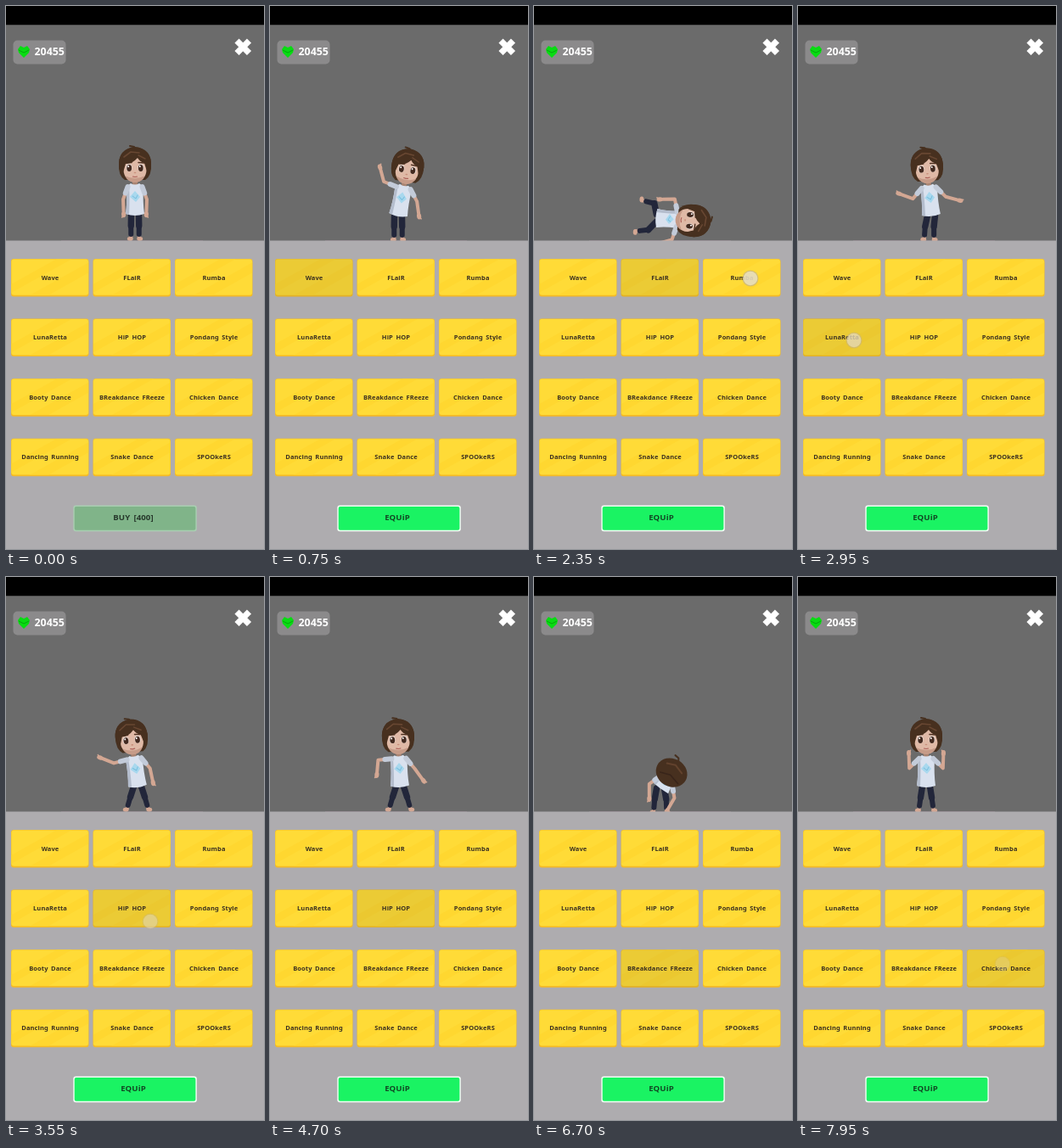
These frames come from a looping animation (304x640 px, 8000 ms). An HTML page with a canvas:

```html
<!DOCTYPE html>
<html lang="en">
<head>
<meta charset="utf-8">
<title>Dance shop</title>
<style>
  html, body { margin: 0; width: 100%; height: 100%; overflow: hidden; background: #aeacaf; }
  canvas { display: block; width: 304px; height: 640px; }
</style>
</head>
<body>
<canvas id="stage"></canvas>
<script>
const LOOP = 8000, STEP = 50;
const FONT = '"Noto Sans", "Open Sans", sans-serif';
const canvas = document.getElementById('stage');
const ctx = canvas.getContext('2d');
const ratio = window.devicePixelRatio || 1;
canvas.width = 304 * ratio;
canvas.height = 640 * ratio;

const SKIN = '#d3a793', FACE = '#dfb9a6', HAIR = '#47301f', SHIRT = '#d9e1ee', JEANS = '#22263a';

const labels = [
  'Wave', 'FLaiR', 'Rumba',
  'LunaRetta', 'HiP HOP', 'Pondang Style',
  'Booty Dance', 'BReakdance FReeze', 'Chicken Dance',
  'Dancing Running', 'Snake Dance', 'SPOOkeRS'
];

// Taps: time, button index, touch position
const taps = [
  [450, 0, 60, 325], [1700, 1, 158, 324], [2400, 2, 255, 321],
  [2950, 3, 66, 394], [3450, 4, 170, 406], [4950, 5, 256, 396],
  [5500, 6, 66, 464], [6100, 7, 160, 464], [7750, 8, 241, 456]
];

// Limb angles are degrees away from straight down, positive pointing outward.
const rest = {
  dx: 0, dy: 0, roll: 0, lean: 0, tuck: 0, bow: 0,
  armL: 20, foreL: -2, armR: 20, foreR: -2,
  legL: 1, shinL: 0, legR: 1, shinR: 0
};
const pose = changes => ({ ...rest, ...changes });
const flipped = p => ({
  ...p, dx: -p.dx, lean: -p.lean,
  armL: p.armR, foreL: p.foreR, armR: p.armL, foreR: p.foreL,
  legL: p.legR, shinL: p.shinR, legR: p.legL, shinR: p.shinL
});

const wide = { legL: 18, shinL: 16, legR: 18, shinR: 16 };
const waveIn = pose({ dx: -1, dy: 1, lean: 11, armL: 112, foreL: 165, armR: 28, foreR: 8 });
const waveOut = pose({ ...waveIn, lean: 8, foreL: 200 });
const dive = pose({ dx: -4, dy: 3, roll: 45, tuck: .2, armL: 45, armR: 50, legL: 30, legR: 20 });
const flair = pose({
  dx: -8, dy: 4, roll: 94, tuck: .26, armL: 75, foreL: -5, armR: 75, foreR: 20,
  legL: 75, shinL: 10, legR: 50, shinR: 10
});
const flairKick = pose({ ...flair, dy: 2, legL: 30, shinL: 20, legR: 75, shinR: 40 });
const sway = pose({ dx: 5, dy: 1, lean: -5, armL: 40, foreL: 110, armR: 45, foreR: 75, legL: 12, shinL: 4, legR: -6 });
const reach = pose({ armL: 62, foreL: 75, armR: 20, foreR: -30, ...wide, legL: 6 });
const point = pose({ dx: 3, dy: 1, lean: -7, armL: 75, foreL: 112, armR: 40, foreR: 12, ...wide });
const swing = pose({ dx: 1, dy: 1, lean: -2, armL: 85, foreL: 5, armR: 40, foreR: 36, ...wide });
const gallop = pose({ dx: -2, dy: 1, lean: 4, armL: 30, foreL: -70, armR: 30, foreR: -70, legL: 34, shinL: -12, legR: 8 });
const shake = pose({ dx: 6, dy: 4, lean: -10, armL: 45, foreL: -25, armR: 45, foreR: -25, legL: 18, shinL: 0, legR: 18, shinR: 0 });
const crouch = pose({
  dx: -3, dy: 3, lean: 36, tuck: .65, bow: 1, armL: 55, foreL: 0, armR: 10, foreR: -30,
  legL: 10, shinL: 5, legR: 10, shinR: 2
});
const freeze = pose({
  dx: 4, dy: -20, roll: 126, tuck: .18, armL: 45, foreL: 20, armR: 70, foreR: -10,
  legL: 45, shinL: -15, legR: 25, shinR: -30
});
const freezeHold = pose({ ...freeze, dx: 6, dy: -17, roll: 132, legL: 55, legR: 35 });
const flap = pose({ dx: -1, dy: 1, armL: 45, foreL: 178, armR: 45, foreR: 178, legL: 9, shinL: 8, legR: 9, shinR: 8 });
const flapUp = pose({ ...flap, armL: 75, foreL: 165, armR: 75, foreR: 165 });

const moves = [
  [0, rest], [450, rest], [750, waveIn], [950, waveOut], [1150, waveIn], [1350, waveOut],
  [1550, waveIn], [1700, waveOut], [1950, dive], [2150, flairKick], [2350, flair], [2420, flairKick],
  [2500, sway], [2730, flipped(sway)], [2950, sway], [3100, reach], [3300, flipped(reach)],
  [3430, reach], [3550, point], [3850, swing], [4120, flipped(point)], [4400, flipped(swing)],
  [4700, swing], [4930, point], [5030, gallop], [5180, flipped(gallop)], [5330, gallop],
  [5480, flipped(gallop)], [5600, shake], [5770, flipped(shake)], [5930, shake], [6080, flipped(shake)],
  [6300, rest], [6500, pose({ dy: 3, ...wide })], [6700, crouch], [6850, crouch], [7080, freeze],
  [7400, freezeHold], [7720, freeze], [7770, rest], [7860, flapUp], [7950, flap], [8000, flapUp]
];

const rad = degrees => degrees * Math.PI / 180;

function poseAt(time) {
  const next = Math.max(1, moves.findIndex(([at]) => at > time));
  const [t0, from] = moves[next - 1], [t1, to] = moves[next];
  const u = (time - t0) / (t1 - t0), k = u * u * (3 - 2 * u);
  const mixed = {};
  for (const key in rest) mixed[key] = from[key] + (to[key] - from[key]) * k;
  return mixed;
}

function box(x, y, w, h, r, fill) {
  ctx.beginPath();
  ctx.roundRect(x, y, w, h, r);
  ctx.fillStyle = fill;
  ctx.fill();
}

function oval(x, y, rx, ry, fill, turn = 0) {
  ctx.beginPath();
  ctx.ellipse(x, y, rx, ry, turn, 0, 7);
  ctx.fillStyle = fill;
  ctx.fill();
}

function shape(path, fill) {
  ctx.fillStyle = fill;
  ctx.fill(new Path2D(path));
}

function line(points, width, color) {
  ctx.beginPath();
  points.forEach(([x, y]) => ctx.lineTo(x, y));
  ctx.lineWidth = width;
  ctx.strokeStyle = color;
  ctx.stroke();
}

function text(value, x, y, size, color, align = 'center') {
  ctx.font = `900 ${size}px ${FONT}`;
  ctx.textAlign = align;
  ctx.textBaseline = 'alphabetic';
  ctx.fillStyle = color;
  ctx.fillText(value, x, y);
}

const extend = ([x, y], side, angle, length) =>
  [x + side * Math.sin(rad(angle)) * length, y + Math.cos(rad(angle)) * length];

function leg(side, thigh, shin) {
  const hip = [side * 4.5, 0];
  const knee = extend(hip, side, thigh, 13);
  const ankle = extend(knee, side, shin, 10);
  const foot = extend(knee, side, shin, 15.5);
  line([ankle, foot], 4, SKIN);
  oval(foot[0] + side, foot[1], 3.4, 2.4, SKIN);
  line([knee, ankle], 6, JEANS);
  line([hip, knee], 7.4, JEANS);
}

function arm(shoulder, side, upper, fore) {
  const cuff = extend(shoulder, side, upper, 8);
  const elbow = extend(shoulder, side, upper, 16);
  const wrist = extend(elbow, side, fore, 14);
  const hand = extend(elbow, side, fore, 17.5);
  line([shoulder, elbow, wrist], 4, SKIN);
  oval(hand[0], hand[1], 2.6, 3.8, SKIN, -side * rad(fore));
  line([hand, extend(hand, side, fore + 30, 4)], 1.6, SKIN);
  line([shoulder, cuff], 6, '#c3cbd9');
}

function head(bow) {
  line([[1, -17], [-1, -21], [-6, -22]], 2, HAIR);
  oval(0, -2, 19, 18.5 - 2 * bow, HAIR);
  if (bow > .5) {
    line([[-10, -9], [0, -12], [11, -7]], 2, '#62422d');
    line([[-12, 4], [0, 1], [13, 6]], 1.5, '#38241a');
    return;
  }
  shape('M-19-2Q-20 13-12 18H12Q20 13 19-2Z', HAIR);
  oval(0, 6, 13.5, 14.5, FACE);
  shape('M-12 13Q0 19 12 13Q8 21 0 21Q-8 21-12 13Z', '#c69b88');
  for (const side of [-1, 1]) {
    oval(side * 7, 3.5, 3.6, 4.4, '#e9ddd6');
    oval(side * 6.8, 4, 2.9, 3.9, '#432a20');
    oval(side * 6.8 - 1, 2.2, .9, 1.1, '#fff');
    line([[side * 11, -2], [side * 4, -2.5]], 1.5, '#503424');
  }
  oval(0, 9.5, 1.4, .8, '#c98f7b');
  line([[-2.5, 14], [0, 14.5], [2.5, 14]], 1.2, '#ad6159');
  shape('M-19 2Q-20-19 0-21Q20-19 19 2L16 13Q13 5 11-2Q6-3 3-8Q-3-1-11-1Q-13 7-16 13Z', HAIR);
  line([[-13, -9], [-5, -15], [5, -14]], 1.6, '#684732');
  line([[4, -11], [12, -7]], 1.5, '#684732');
}

function dancer(p) {
  const stretch = 1 - p.tuck, lean = rad(p.lean);
  const onBody = (x, y) => [
    x * Math.cos(lean) - y * stretch * Math.sin(lean),
    x * Math.sin(lean) + y * stretch * Math.cos(lean)
  ];
  ctx.save();
  ctx.beginPath();
  ctx.rect(0, 22, 304, 255);
  ctx.clip();
  ctx.translate(152 + p.dx, 246 + p.dy);
  ctx.rotate(rad(p.roll));
  ctx.lineCap = ctx.lineJoin = 'round';
  leg(-1, p.legL, p.shinL);
  leg(1, p.legR, p.shinR);

  ctx.save();
  ctx.rotate(lean);
  ctx.scale(1, stretch);
  box(-3, -42, 6, 9, 2, '#a98472');
  shape('M-5-37Q0-34 5-37L10-33Q9-15 11-1Q0 3-11-1Q-9-15-10-33Z', SHIRT);
  shape('M-10-33Q-9-15-11-1L-7 0Q-6-20-7-35Z', '#b4bdcd');
  shape('M0-28L6-21L1-15L-6-21Z', '#a8d8ee');
  line([[-3, -22], [1, -19], [3, -23]], 1, '#78bedf');
  ctx.restore();

  arm(onBody(-8.5, -33), -1, p.armL, p.foreL);
  arm(onBody(8.5, -33), 1, p.armR, p.foreR);
  ctx.translate(...onBody(0, -59));
  ctx.rotate(lean * .8);
  head(p.bow);
  ctx.restore();
}

function danceButton(label, index, selected) {
  const x = 6 + index % 3 * 96.5, y = 298 + Math.floor(index / 3) * 70.6;
  box(x, y, 91.5, 44.5, 3, '#f5bb24');
  ctx.save();
  box(x + .4, y + .4, 90.7, 42.4, 3, '#ffdb37');
  ctx.clip();
  ctx.translate(x, y);
  shape('M0 30L54 0H72L0 40Z', '#ffd730');
  shape('M20 44L92 4V16L42 44Z', '#ffd730');
  ctx.restore();
  if (selected) box(x, y, 91.5, 44.5, 3, 'rgba(165,145,45,.22)');
  text(label, x + 46, y + 24.5, 7.5, '#3b3020');
}

function buyButton(owned) {
  box(79.3, 588.5, 145.5, 30.7, 3, owned ? '#f3fff6' : '#a9cfb2');
  box(80.7, 589.9, 142.7, 27.9, 2, owned ? '#1af363' : '#80b489');
  text(owned ? 'EQUiP' : 'BUY [400]', 150, 606, 9.6, owned ? '#124a25' : '#26382b');
}

function header() {
  box(0, 0, 304, 22.3, 0, '#000');
  box(8.5, 40.5, 62, 28, 5, '#8b8a8b');
  shape('M14 51L17 47L21 49L25 47L28 51L27 55L21 61L15 55Z', '#08dc12');
  line([[15, 52], [21, 55], [27, 52]], 1, '#04a50c');
  text('20455', 33.5, 58, 12.4, '#fff', 'left');
  ctx.lineCap = 'butt';
  line([[272, 41], [286.5, 55.5]], 7.2, '#fff');
  line([[286.5, 41], [272, 55.5]], 7.2, '#fff');
}

function touch(time) {
  for (const [at, , x, y] of taps) {
    const age = time - at;
    if (age < -120 || age > 300) continue;
    ctx.globalAlpha = age < 0 ? .7 : .55 * (1 - age / 300);
    oval(x, y, 9.5, 9.5, '#c2b38b');
    oval(x, y, 8.3, 8.3, '#f0e8d0');
    ctx.globalAlpha = 1;
  }
}

function draw(time) {
  ctx.setTransform(ratio, 0, 0, ratio, 0, 0);
  box(0, 22, 304, 255, 0, '#6b6b6b');
  header();
  box(65, 276, 167, 1, 0, '#82767c');
  dancer(poseAt(time));
  box(0, 276.6, 304, 364, 0, '#aeacaf');
  const current = taps.filter(([at]) => at <= time).pop();
  ctx.letterSpacing = '.1px';
  ctx.wordSpacing = '1.5px';
  labels.forEach((label, i) => danceButton(label, i, current && current[1] === i));
  buyButton(Boolean(current));
  ctx.letterSpacing = ctx.wordSpacing = '0px';
  touch(time);
}

const start = performance.now();
function tick() {
  const elapsed = (performance.now() - start) % LOOP;
  draw(Math.floor(elapsed / STEP) * STEP);
  requestAnimationFrame(tick);
}
tick();
</script>
</body>
</html>
```
